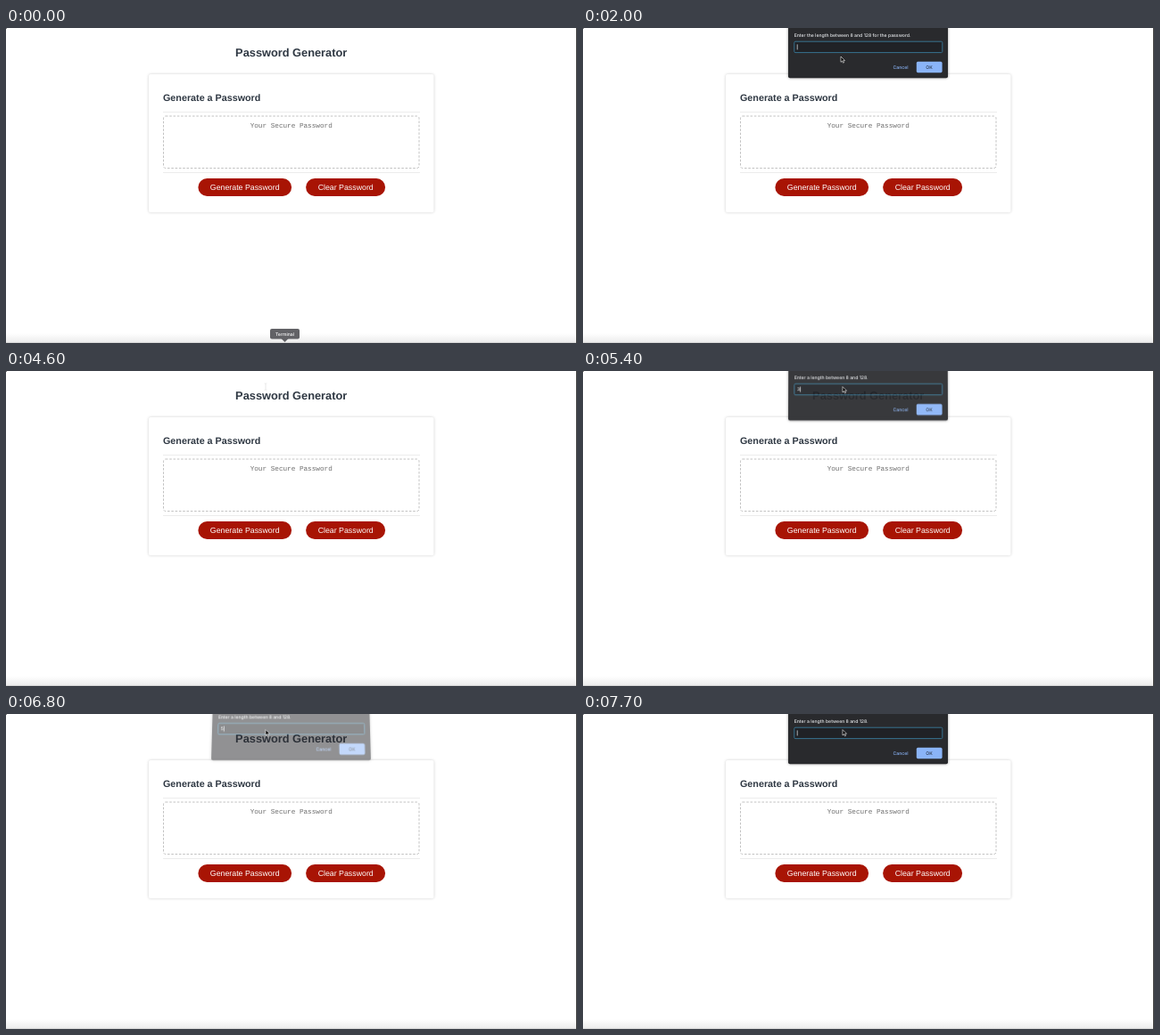
An HTML page for the animation above (8 s loop, 640x354 px).

```html
<!DOCTYPE html>
<html lang="en">
<head>
<meta charset="utf-8">
<title>Password Generator</title>
<style>
  html, body { margin: 0; width: 100%; height: 100%; overflow: hidden; background: #fff; }
  #stage { position: fixed; inset: 0; overflow: hidden; contain: strict; }
  svg { position: absolute; left: 0; top: 0; width: 640px; height: 354px; overflow: hidden; }
  text { font-family: "Liberation Sans", Arial, sans-serif; text-rendering: geometricPrecision; }
  .ui { font: 500 5.13px Inter, Roboto, sans-serif; }
  .mid { text-anchor: middle; }
  .head { font-weight: 700; fill: #2f3843; }
  .card { filter: drop-shadow(0 .8px 1.4px rgba(0, 0, 0, .2)); }
  .btn rect { fill: #a81404; }
  .btn text { fill: #fff; font-size: 8.8px; }
  #dialog { height: 64px; overflow: visible; transform-origin: 320px 57px; }
  .sheet { filter: drop-shadow(0 .8px 1.7px rgba(0, 0, 0, .4)); }
</style>
</head>
<body>
<div id="stage">
<svg viewBox="0 0 640 354">
  <defs>
    <linearGradient id="fade" x2="0" y2="1">
      <stop offset="0" stop-color="#fff"/>
      <stop offset="1" stop-color="#ebebeb"/>
    </linearGradient>
  </defs>
  <rect y="343" width="640" height="11" fill="url(#fade)"/>
  <rect y="353" width="640" height="1" fill="#d8d8d8"/>
  <rect x="639" width="1" height="354" fill="#3c3c3c"/>
  <rect width="1" height="1" fill="#777"/>

  <text class="head mid" x="319.7" y="32.1" font-size="12.8">Password Generator</text>
  <rect class="card" x="160" y="52" width="319.5" height="155.3" rx="2" fill="#fff"/>
  <text class="head" x="176" y="82.2" font-size="10.75">Generate a Password</text>
  <path d="M176 94.5H464M176 162.5H464" stroke="#e7e7e7" stroke-width=".8"/>
  <rect x="176.5" y="99" width="286.5" height="58.5" rx="2.4" fill="#fff"
        stroke="#bcbcbc" stroke-width=".9" stroke-dasharray="2.6 1.7"/>
  <text class="mid" x="319.7" y="112.3" font-size="7.68" fill="#6c6c6c"
        style="font-family:'Liberation Mono','Courier New',monospace">Your Secure Password</text>
  <g class="btn mid">
    <rect x="215.4" y="169" width="104.7" height="20" rx="10"/>
    <text x="267.7" y="182">Generate Password</text>
    <rect x="336.1" y="169" width="89" height="20" rx="10"/>
    <text x="380.7" y="182">Clear Password</text>
  </g>

  <g id="tip">
    <path d="M308.5 349H316.5L312.5 353Z" fill="#626266"/>
    <rect x="296" y="338" width="33" height="11.5" rx="2" fill="#626266"/>
    <text class="ui mid" x="312.5" y="345.5" fill="#fff">Terminal</text>
  </g>
</svg>

<svg id="dialog" viewBox="0 0 640 64">
  <rect class="sheet" x="230" y="-24" width="179" height="80.3" rx="2" fill="#292a2d"/>
  <text class="ui" id="ask" x="236.7" y="9.9" fill="#e8eaed"></text>
  <rect x="236.8" y="15.2" width="166" height="12.4" rx="1.2" fill="#202226" stroke="#37718f"/>
  <text class="ui" id="entry" x="239.8" y="23.2" fill="#e8eaed"></text>
  <rect id="caret" y="18.4" width=".7" height="6" fill="#e8eaed"/>
  <text class="ui mid" x="356" y="45.5" fill="#8ab4f8">Cancel</text>
  <rect x="373.8" y="37.8" width="28.8" height="12.4" rx="1.6" fill="#8ab4f8"/>
  <text class="ui mid" x="388.1" y="45.7" fill="#2a3648">OK</text>
</svg>

<svg viewBox="0 0 640 354">
  <path id="arrow" d="M0 0V6.3L1.5 5L2.5 7.2L3.5 6.8L2.6 4.6H4.5Z"
        fill="#000" stroke="#fff" stroke-width=".6"/>
  <path id="hand" d="M-.6 .6Q0 -.6 .6 .6V3L3.8 3.7Q4.4 4 4.2 5L3.4 8H-.4L-2.4 5Q-2.2 4 -.6 5Z"
        fill="#fff" stroke="#000" stroke-width=".6"/>
  <path id="beam" d="M-1.3 -3.8Q0 -3.8 0 -3Q0 -3.8 1.3 -3.8M0 -3V3M-1.3 3.8Q0 3.8 0 3Q0 3.8 1.3 3.8"
        fill="none" stroke="#e6e6e6" stroke-width=".9"/>
</svg>
</div>

<script>
const LOOP = 8000, STEP = 100, FADE_IN = 150, FADE_OUT = 270;
const $ = id => document.getElementById(id);
const clamp = v => Math.min(1, Math.max(0, v));
const smooth = v => v * v * (3 - 2 * v);

// Each prompt opens, takes one digit (2, 3, 4 ...) and closes
const prompts = [
  { open: 1450, key: 3200, close: 4330 },
  { open: 4750, key: 5100, close: 5330 },
  { open: 5650, key: 5900, close: 6036 },
  { open: 6300, key: 6500, close: 6613 },
  { open: 6900, key: 7200, close: 7400 },
  { open: 7550, key: LOOP, close: LOOP }
];

// Pointer: dock, button, prompt, input field
const start = { x: 316, y: 346 };
const moves = [
  { from: 100, to: 900, x: 269, y: 176 },
  { from: 1700, to: 2000, x: 289, y: 32 },
  { from: 2200, to: 2800, x: 291, y: 17.6 }
];

function pointerAt(t) {
  return moves.reduce((p, m) => {
    const k = smooth(clamp((t - m.from) / (m.to - m.from)));
    return { x: p.x + (m.x - p.x) * k, y: p.y + (m.y - p.y) * k };
  }, start);
}

function show(el, on) { el.style.display = on ? '' : 'none'; }

function drawDialog(t) {
  const i = prompts.findLastIndex(p => p.open <= t);
  show($('dialog'), i >= 0);
  if (i < 0) return;

  const { open, key, close } = prompts[i];
  const opacity = clamp((t - open) / FADE_IN) * (1 - clamp((t - close) / FADE_OUT) ** 2);
  const away = 1 - opacity;
  const filled = t >= key;
  $('dialog').style.opacity = opacity;
  $('dialog').style.transform = away
    ? `translateY(${-9 * away}px) perspective(600px) rotateX(${23 * away}deg) scaleY(${1 + .09 * away})`
    : 'none';
  $('ask').textContent = i
    ? 'Enter a length between 8 and 128.'
    : 'Enter the length between 8 and 128 for the password.';
  $('entry').textContent = filled ? i + 2 : '';
  $('caret').setAttribute('x', filled ? 243.2 : 239.8);
  show($('caret'), t < key + 600);
}

function drawPointer(t) {
  const { x, y } = pointerAt(t);
  const kind = t < 100 ? '' : y > 168 && y < 190 ? 'hand' : t >= 2500 && t < 4700 ? 'beam' : 'arrow';
  for (const id of ['arrow', 'hand', 'beam']) {
    show($(id), id === kind);
    $(id).setAttribute('transform', `translate(${x} ${y})`);
  }
}

const began = performance.now();
function tick() {
  const t = Math.floor((performance.now() - began) % LOOP / STEP) * STEP;
  show($('tip'), t < 200);
  drawDialog(t);
  drawPointer(t);
  requestAnimationFrame(tick);
}
tick();
</script>
</body>
</html>
```
